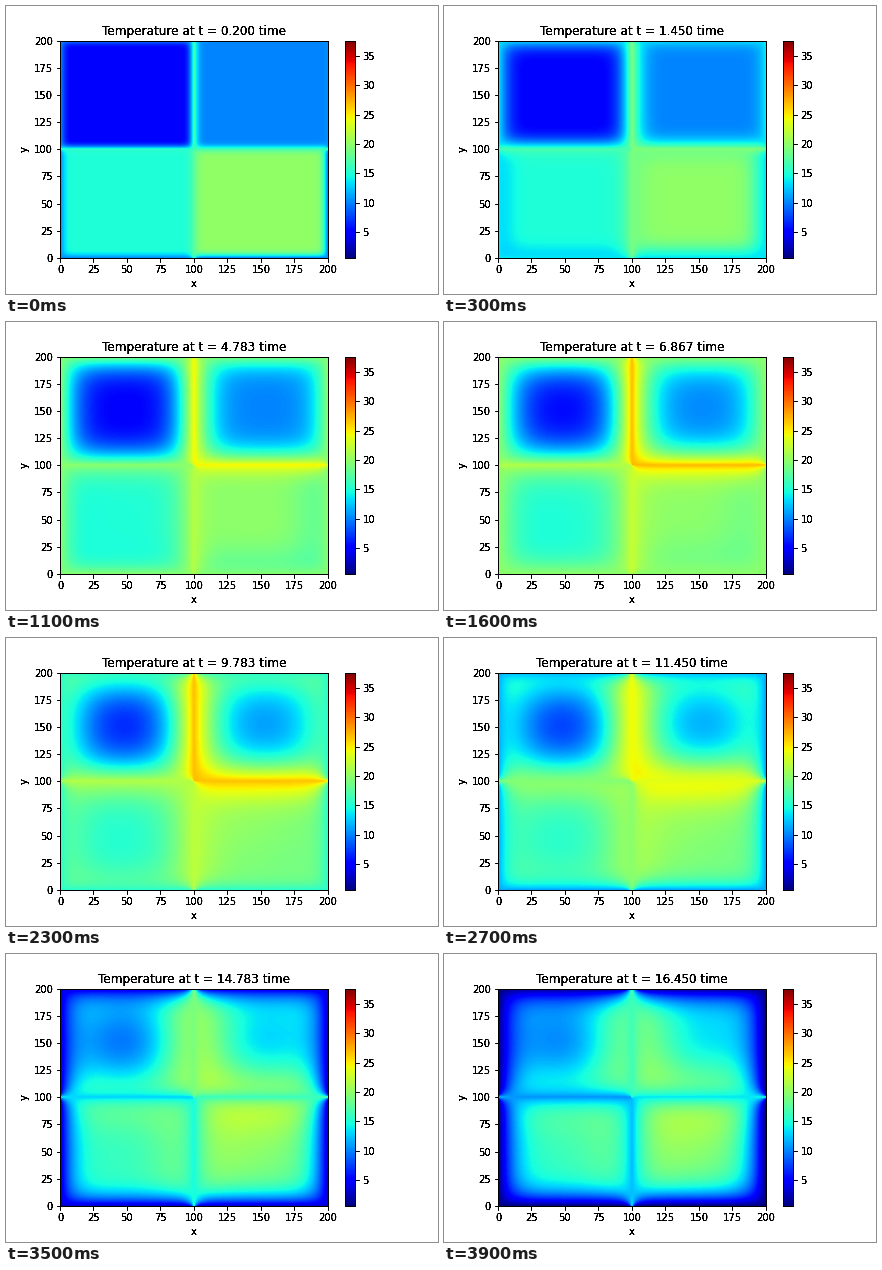
These frames come from a looping animation (432 by 288 pixels, 4000 ms). A matplotlib script:

```python
import numpy as np
import matplotlib.pyplot as plt
from matplotlib.animation import FuncAnimation

FRAMES, INTERVAL = 40, 100
T_START, T_STEP = 0.2, 5 / 12
N, MID = 201, 100
DIFFUSIVITY = 30.0

# Temperature of each inner wall at a few moments
WALL_TIMES = [0.2, 3.1, 6.9, 9.8, 13.1, 14.8, 16.5]
LEFT = [15.5, 18.5, 21.5, 21.5, 17.3, 12.8, 10.5]
BOTTOM = [17.5, 21, 22.5, 22, 17.3, 14.5, 12]
TOP = [16.5, 22.8, 27, 26.8, 22, 19, 16.2]
RIGHT = [16.5, 23, 27, 26.6, 20.5, 16, 13.5]

span = np.arange(N)
from_mid = np.abs(span - MID)
from_edge = np.minimum(span, N - 1 - span)
tip_shape = np.exp(-from_edge / 4)
flare = np.exp(-from_mid / 1.5)


def apply_walls(u, t):
    left, bottom, top, right = (np.interp(t, WALL_TIMES, w)
                                for w in (LEFT, BOTTOM, TOP, RIGHT))
    tip = np.clip(0.8 * (t - 12), 0, 3) * tip_shape
    outside = 10 + 10 * np.sin(2 * np.pi * t / 24)

    def edge(wall):
        return outside + (wall + tip[0] - outside) * flare

    u[0], u[-1] = edge(bottom), edge(top)
    u[:, 0], u[:, -1] = edge(left), edge(right)
    u[MID, :MID] = left + tip[:MID]
    u[:MID, MID] = bottom + tip[:MID]
    u[MID:, MID] = top + tip[MID:]
    u[MID, MID + 1:] = right + tip[MID + 1:]


def advance(u, t, duration, steps):
    dt = duration / steps
    for i in range(steps):
        core = u[1:-1, 1:-1]
        lap = u[2:, 1:-1] + u[:-2, 1:-1] + u[1:-1, 2:] + u[1:-1, :-2] - 4 * core
        core += DIFFUSIVITY * dt * lap
        apply_walls(u, t + (i + 1) * dt)


def simulate():
    u = np.empty((N, N))
    u[:MID, :MID], u[:MID, MID:] = 15, 20
    u[MID:, :MID], u[MID:, MID:] = 5, 10
    apply_walls(u, 0)
    advance(u, 0, T_START, 30)
    fields = [u.copy()]
    for k in range(FRAMES - 1):
        advance(u, T_START + k * T_STEP, T_STEP, 60)
        fields.append(u.copy())
    return fields


def harden(img, dpi):
    """Turn soft ink into heavy, nearly solid black."""
    out = np.zeros_like(img)
    out[..., 3] = np.clip((img[..., 3] - 0.1) * 3, 0, 1)
    return out, 0, 0


fields = simulate()

plt.rcParams.update({"font.family": "DejaVu Sans", "font.size": 10})
fig, ax = plt.subplots(figsize=(6, 4), dpi=72, facecolor="white")
fig.subplots_adjust(left=0.125, right=0.9, bottom=0.125, top=0.88)

image = ax.imshow(fields[0], origin="lower", extent=(0, 200, 0, 200),
                  aspect="auto", cmap="jet", vmin=0.6, vmax=37.6,
                  interpolation="bilinear")
bar = fig.colorbar(image, ax=ax, ticks=range(5, 40, 5))
ax.set_xticks(range(0, 201, 25))
ax.set_yticks(range(0, 201, 25))
ax.set_xlabel("x")
ax.set_ylabel("y")
title = ax.set_title("", fontsize=12)

for artist in (title, ax.xaxis, ax.yaxis, bar.ax.yaxis, bar.outline,
               *ax.spines.values()):
    artist.set_agg_filter(harden)


def draw(k):
    image.set_data(fields[k])
    title.set_text(f"Temperature at t = {T_START + k * T_STEP:.3f} time")
    return image, title


anim = FuncAnimation(fig, draw, frames=FRAMES, interval=INTERVAL,
                     repeat=True, repeat_delay=0, blit=False)
plt.show()
```
